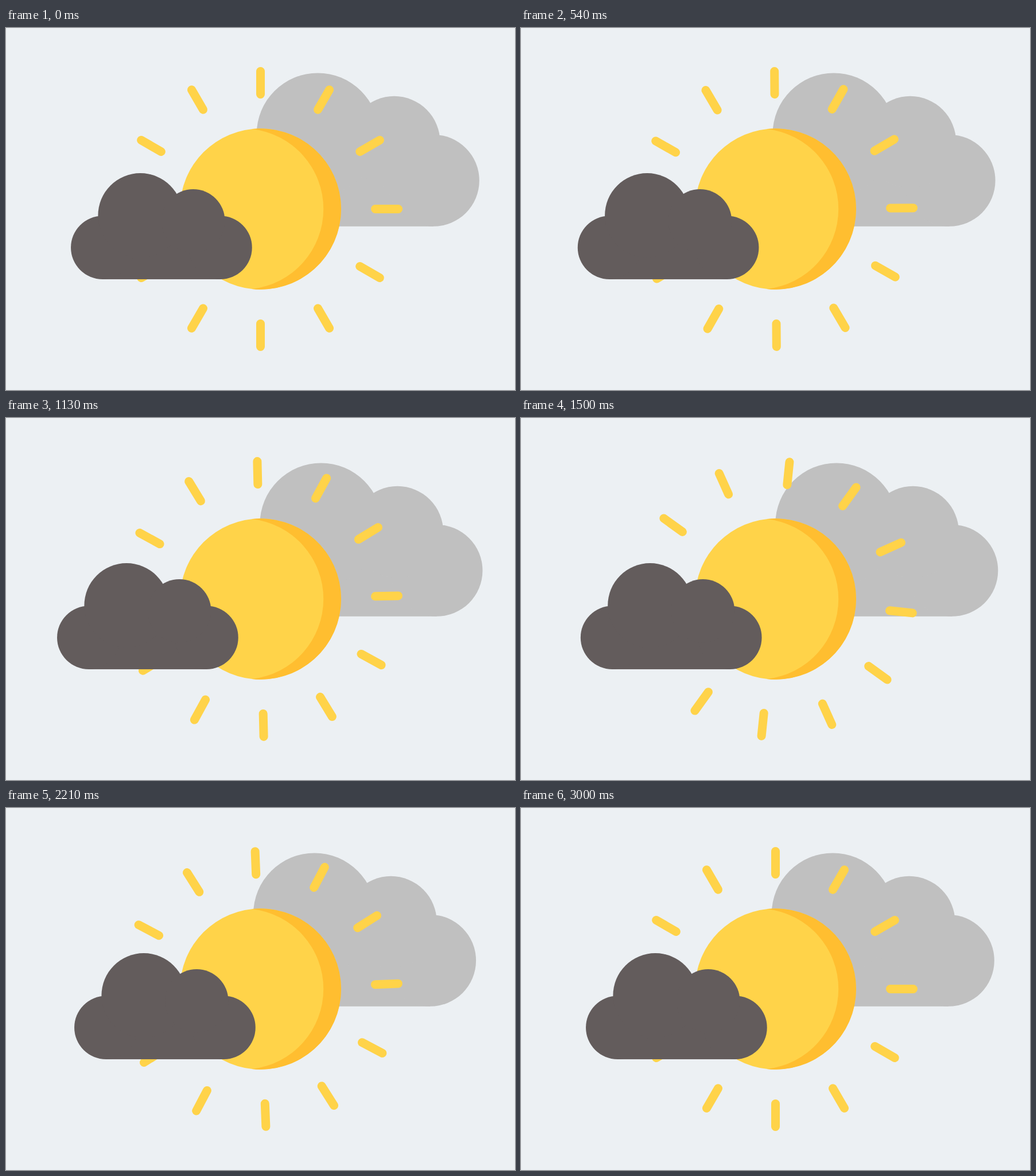
These frames come from a looping animation (887x631 px, 4.04 s). An HTML page:

```html
<!DOCTYPE html>
<html lang="en">
<head>
<meta charset="utf-8">
<title>Sun and clouds</title>
<style>
  html, body { margin: 0; width: 100%; height: 100%; overflow: hidden; background: #ecf0f3; }
  svg { display: block; width: 100%; height: 100%; }
</style>
</head>
<body>
<svg viewBox="0 0 887 631">
  <defs>
    <!-- Unit cloud: the right lobe has radius 1 around the origin -->
    <g id="cloud">
      <rect x="-3.714" y="-1" width="3.714" height="2"/>
      <circle r="1"/>
      <circle cx="-3.714" r="1"/>
      <circle cx="-2.523" cy="-1.012" r="1.334"/>
      <circle cx="-.856" cy="-.841" r="1"/>
    </g>
  </defs>
  <g id="backCloud" fill="#c0c0c0">
    <use href="#cloud" transform="translate(744.9 265.9) scale(79.9)"/>
  </g>
  <g transform="translate(443.5 315.5)">
    <g id="rays" stroke="#ffd349" stroke-width="15" stroke-linecap="round"></g>
    <circle r="140.25" fill="#ffd349"/>
    <path fill="#ffbe30" d="M-15.1-139.4A140.25 140.25 0 1 1-15.1 139.4A140.25 140.25 0 0 0-15.1-139.4"/>
  </g>
  <g id="frontCloud" fill="#635c5c">
    <use href="#cloud" transform="translate(373.5 382.7) scale(55.25)"/>
  </g>
</svg>
<script>
  const LOOP = 4040, MOTION = 3000, FRAME = 1000 / 24;
  const [backCloud, rays, frontCloud] =
    ['backCloud', 'rays', 'frontCloud'].map(id => document.getElementById(id));

  // Each track is a list of [time in ms, value].
  const backTrack = [[0, 0], [1500, 6.5], [2000, -6.3], [3000, 0]];
  const frontTrack = [[0, 0], [1000, -25], [2000, 6.6], [3000, 0]];
  const rayTrack = [[0, 0], [2000, -200], [3000, 0]];

  for (let angle = 0; angle < 360; angle += 30) {
    rays.innerHTML += `<line y1="-200" y2="-240" transform="rotate(${angle})"/>`;
  }

  // cubic-bezier(.42, 0, .58, 1), solved by bisection
  function easeInOut(x) {
    let low = 0, high = 1, s = 0.5;
    for (let i = 0; i < 24; i++) {
      s = (low + high) / 2;
      const guess = 1.26 * s * (1 - s) ** 2 + 1.74 * s * s * (1 - s) + s ** 3;
      if (guess < x) low = s; else high = s;
    }
    return s * s * (3 - 2 * s);
  }

  function valueAt(track, time) {
    const next = track.findIndex(([keyTime]) => keyTime > time);
    if (next < 0) return track[track.length - 1][1];
    const [t0, v0] = track[next - 1], [t1, v1] = track[next];
    return v0 + (v1 - v0) * easeInOut((time - t0) / (t1 - t0));
  }

  const start = performance.now();

  function draw() {
    const elapsed = (performance.now() - start) % LOOP;
    // 24 steps per second, switching on whole hundredths of a second
    const step = Math.floor((elapsed + 4.9) / FRAME);
    const time = Math.min(step * FRAME, MOTION);
    backCloud.setAttribute('transform', `translate(${valueAt(backTrack, time)} 0)`);
    frontCloud.setAttribute('transform', `translate(${valueAt(frontTrack, time)} 0)`);
    rays.setAttribute('transform', `rotate(${valueAt(rayTrack, time)})`);
    requestAnimationFrame(draw);
  }
  draw();
</script>
</body>
</html>
```
